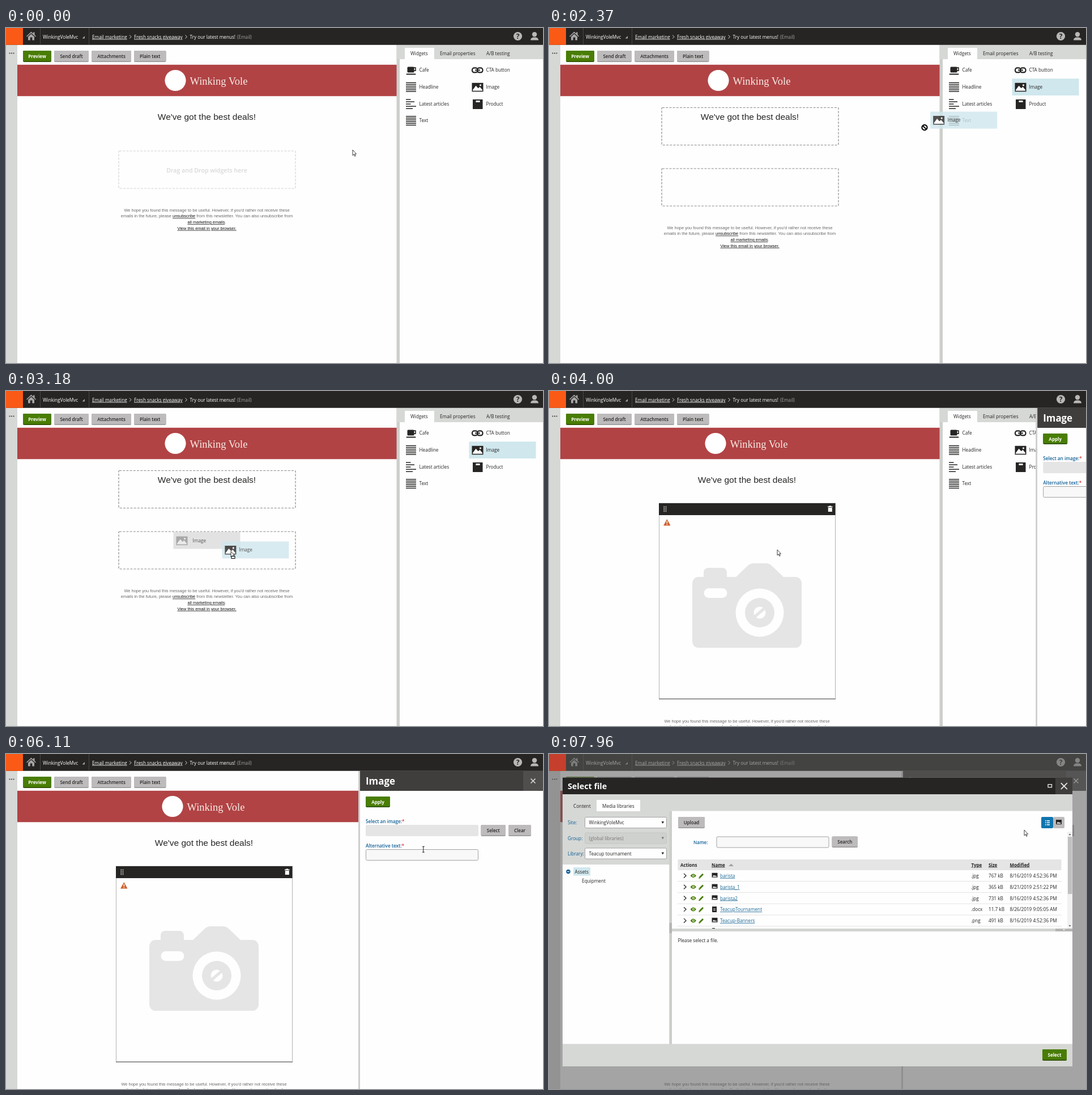
Write an HTML page that moves like this. It is 948 by 591 pixels and loops after 8000 ms.

```html
<!DOCTYPE html>
<html lang="en">
<head>
<meta charset="utf-8">
<title>Email builder</title>
<style>
html, body { margin: 0; width: 100%; height: 100%; overflow: hidden; background: #fefefe; }
svg { display: block; width: 948px; height: 591px; }
text { font: 8.2px "Open Sans", "Noto Sans", sans-serif; fill: #262524; white-space: pre; }
text.white { fill: #fff; }
text.grey { fill: #a3a2a2; }
text.bold { font-weight: 700; }
text.semi { font-weight: 600; font-size: 8px; }
text.label { fill: #0f5f96; }
text.link { fill: #1a6896; text-decoration: underline; }
text.under { text-decoration: underline; }
text.mid { text-anchor: middle; }
text.title { font-weight: 700; fill: #fff; }
text.mail { font: 7.46px "Liberation Sans", Arial, sans-serif; fill: #6a6a6a; text-anchor: middle; }
text.headline { font: 15.5px "Liberation Sans", Arial, sans-serif; text-anchor: middle; }
text.brand { font: 18.5px "Liberation Serif", serif; fill: #f8ece4; }
.mail tspan { fill: #111; text-decoration: underline; }
</style>
</head>
<body>
<svg id="stage" viewBox="0 0 948 591"></svg>
<script>
const DARK = '#262524', BAR = '#d6d8d5', GREEN = '#497d04', BUTTON = '#bdbbbb', PALE = '#cfe7ed';
const LOOP = 8000;

const rect = (x, y, w, h, fill, more = '') =>
  `<rect x="${x}" y="${y}" width="${w}" height="${h}" fill="${fill}" ${more}/>`;
const path = (d, fill = DARK, more = '') => `<path d="${d}" fill="${fill}" ${more}/>`;
const line = (d, color, width = 1) => path(d, 'none', `stroke="${color}" stroke-width="${width}"`);
const dot = (x, y, r, fill) => `<circle cx="${x}" cy="${y}" r="${r}" fill="${fill}"/>`;
const text = (x, y, s, cls = '', style = '') =>
  `<text x="${x}" y="${y}" class="${cls}" style="${style}">${s}</text>`;
const group = (id, body, more = '') => `<g id="${id}" ${more}>${body}</g>`;
const move = (x, y, body) => `<g transform="translate(${x} ${y})">${body}</g>`;

function button(x, y, w, h, label, green) {
  return rect(x, y, w, h, green ? '#2c4d02' : '#989797', 'rx="2"') +
    rect(x, y, w, h - 1.4, green ? GREEN : BUTTON, 'rx="1.5"') +
    text(x + w / 2, y + h / 2 + 3, label, green ? 'mid white bold' : 'mid semi', green ? 'font-size:8px' : '');
}
const field = (x, y, w, h, fill = '#f8f8f8') =>
  rect(x, y, w, h, fill, 'rx="2" stroke="#a3a2a2"');
const cross = (x, y, r, color, width) =>
  line(`M${x - r} ${y - r}L${x + r} ${y + r}M${x + r} ${y - r}L${x - r} ${y + r}`, color, width);

// Widget icons, placed relative to the top left corner of their list item
const rows = (pitch, widths) => widths.map((w, i) => rect(6.5, 6.4 + i * pitch, w, 1.5, DARK)).join('');
const icons = {
  cup: rect(9, 9, 12, 10, DARK, 'rx="1.5"') + line('M20.5 10.5h3v5h-3', DARK, 1.6) + rect(7, 21, 17, 2, DARK, 'rx="1"'),
  lines: rows(3.1, [18, 18, 18, 18, 18, 18]),
  list: rows(4, [8.5, 15, 8.5, 18, 12]),
  chain: [5.5, 14.5].map(x => rect(x, 10.8, 9.5, 8, 'none', `rx="3.5" stroke="${DARK}" stroke-width="2.2"`)).join('') +
    rect(10.5, 13.8, 9, 2, DARK),
  picture: rect(5, 7.5, 20, 15.5, DARK) + path('M6.5 20L12 12.5L16 17L19 14.5L23.5 20V21.5H6.5Z', '#fff') + dot(20, 11.5, 1.6, '#fff'),
  box: rect(6.5, 7, 17.5, 17, DARK) + rect(12, 9, 7, 3, '#fff')
};
const items = [
  ['Cafe', 0, 0, 'cup'], ['CTA button', 1, 0, 'chain'], ['Headline', 0, 1, 'lines'], ['Image', 1, 1, 'picture'],
  ['Latest articles', 0, 2, 'list'], ['Product', 1, 2, 'box'], ['Text', 0, 3, 'lines']
].map(([name, col, row, icon]) => ({ name, icon, x: 699.5 + 118 * col, y: 59.6 + 29.7 * row }));
const item = w => icons[w.icon] + text(30, 17.8, w.name);
const IMAGE = items[3];

const topBar = rect(0, 0, 948, 29.8, DARK) + rect(0, 0, 30, 29.8, '#fa5a16') +
  path('M36 14.5L44.5 6.5L48 9.8V7.5H50.5V12L53 14.5L52 15.6L44.5 8.8L37 15.6ZM39 15.4L44.5 10.4L50 15.4V21.5H46.3V16.5H42.7V21.5H39Z', '#aaa8a7') +
  line('M60.5 0V29M146.5 0V29', '#4a4847') +
  text(65, 18.6, 'WinkingVoleMvc', 'white') + path('M134.5 18.5H139V14Z', '#a3a2a2') +
  text(152, 18.6, 'Email marketing', 'white under') + text(226, 18.6, 'Fresh snacks giveaway', 'white under') +
  line('M218 12.5L221 15.5L218 18.5M316.5 12.5L319.5 15.5L316.5 18.5', '#ddd') +
  text(324.5, 18.6, 'Try our latest menus!', 'white') + text(408, 18.6, '(Email)', 'grey') +
  dot(903.5, 14.5, 7.6, '#b9b7b6') + text(903.5, 18.8, '?', 'mid bold', 'font-size:12px') +
  dot(933, 11.3, 4.2, '#b9b7b6') + path('M926 21.5Q926 17.5 930.5 16.5H935.500Q940 17.5 940 21.5Z', '#b9b7b6');

const sideBar = rect(0, 29.8, 20, 562, BAR) +
  [6.5, 10, 13.5].map(x => dot(x, 44.5, 1.1, '#403e3d')).join('');

const toolbar = button(30, 40, 50, 20, 'Preview', true) + button(85, 40, 61, 20, 'Send draft') +
  button(151, 40, 70, 20, 'Attachments') + button(226, 40, 56.5, 20, 'Plain text');

const zone = (y, color) =>
  rect(199, y, 312, 66, 'none', `rx="1" stroke="${color}" stroke-width="1.2" stroke-dasharray="4 2.2"`);

const footer = [
  `We hope you found this message to be useful. However, if you'd rather not receive these`,
  `emails in the future, please <tspan>unsubscribe</tspan> from this newsletter. You can also unsubscribe from`,
  `<tspan>all marketing emails</tspan>.`,
  `<tspan>View this email in your browser.</tspan>`
].map((s, i) => text(354.5, 323.8 + i * 10.65, s, 'mail')).join('');

const camera = rect(253, 328, 193, 125, '#e5e5e5', 'rx="11"') + rect(273, 312, 41, 30, '#e5e5e5', 'rx="8"') +
  path('M328 330L350 309Q355 304 361 304H383Q389 304 394 309L416 330Z', '#e5e5e5') +
  rect(273.5, 348, 41, 17, '#fefefe', 'rx="8.5"') + dot(372, 391, 42.5, '#fefefe') + dot(372, 391, 26, '#e5e5e5') +
  dot(372, 391, 10.5, '#fefefe') + line('M361 400L382 382', '#e5e5e5', 5);

const imageWidget = rect(194.5, 198, 311, 345, '#fefefe', 'stroke="#b4b3b2"') + line('M194 543.3H506', '#6f6e6d', 1.3) +
  rect(194, 198, 311.5, 21, DARK) +
  [0, 1, 2, 3].map(i => rect(202.5, 203.5 + i * 2.7, 1.6, 1.6, '#ddd') + rect(205.7, 203.5 + i * 2.7, 1.6, 1.6, '#ddd')).join('') +
  rect(492, 203.5, 8.5, 1.7, '#fff') + rect(494.5, 202.5, 3.5, 1.5, '#fff') + path('M492.8 206H499.8V213H492.8Z', '#fff') +
  path('M208.3 226L214.5 237.5H202Z', '#cf6130') + rect(207.6, 229.5, 1.5, 4, '#fff') + rect(207.6, 234.7, 1.5, 1.5, '#fff') +
  camera;

const widgetPanel = rect(689.5, 29.8, 5.5, 562, '#cdcfcc') + rect(695, 29.8, 253, 562, '#fefefe') +
  rect(689.5, 29.8, 258.5, 25.2, BAR) + rect(704, 35, 52, 20.5, '#fefefe') +
  text(714, 48.3, 'Widgets') + text(766, 48.3, 'Email properties') + text(848, 48.3, 'A/B testing') +
  items.map((w, i) => move(w.x, w.y, rect(0, 0, 118, 29.7, PALE, `id="hover${i}"`) + item(w))).join('');

const label = (y, s) => text(635, y, `${s}<tspan fill="#d33">*</tspan>`, 'label semi', 'font-size:8.2px');
const settings = rect(622, 29.8, 3, 562, '#cdcfcc') + rect(625, 29.8, 323, 562, '#fefefe') +
  rect(625, 29.8, 323, 35.2, '#403e3d') + rect(913, 29.8, 35, 35.2, '#504e4d') +
  text(635, 54, 'Image', 'title', 'font-size:16.9px') + cross(930.5, 47.5, 4, '#ddd', 1.5) +
  button(635, 75, 43, 19, 'Apply', true) +
  label(122, 'Select an image:') + rect(635, 125, 199, 20, '#e5e5e5', 'rx="2"') +
  button(838.5, 125, 43.5, 20, 'Select') +
  group('pressed', rect(838.5, 125, 43.5, 20, '#a09f9d', 'rx="2"') + text(860.2, 138, 'Select', 'mid semi')) +
  button(887, 125, 40, 20, 'Clear') +
  label(165, 'Alternative text:') + field(635.5, 168.5, 198, 19) +
  group('tip', rect(847.5, 142.5, 62, 14, '#fff', 'stroke="#8a8a8a" stroke-width=".8"') +
    text(878.5, 152.2, 'Select an image', 'mid', 'font-size:7.4px;fill:#575757'));

// File dialog
const picker = (y, name, value, off) => text(33, y + 13, name, 'label') +
  rect(63.5, y + .5, 144, 19, off ? '#cfd1ce' : '#fefefe', `rx="2" stroke="${off ? '#c4c6c3' : '#a3a2a2'}"`) +
  text(70.5, y + 13.3, value, '', off ? 'fill:#777' : '') + path(`M198.5 ${y + 8}h4.6l-2.3 4Z`, off ? '#777' : DARK);
const photo = (x, y) => rect(x, y, 10, 8, DARK) + path(`M${x + 1} ${y + 6.7}l2.6-3 2 1.8 1.4-1 2 2.2Z`, '#fff');
const files = [
  ['barista', '.jpg', '767 kB', '8/16/2019 4:52:36 PM'],
  ['barista_1', '.jpg', '365 kB', '8/21/2019 2:51:22 PM'],
  ['barista2', '.jpg', '731 kB', '8/16/2019 4:52:36 PM'],
  ['TeacupTournament', '.docx', '11.7 kB', '8/26/2019 9:05:05 AM'],
  ['Teacup-Banners', '.png', '491 kB', '8/16/2019 4:52:36 PM']
].map(([name, type, size, date], i) => {
  const y = 214.7 + i * 19.8;
  return line(`M238 ${y - 3.8}l4 3.8-4 3.8`, DARK, 1.3) +
    path(`M249.5 ${y}q5-7 10.5 0q-5.5 7-10.5 0Z`, GREEN) + dot(254.8, y, 2, '#fff') + dot(254.8, y, 1.1, GREEN) +
    line(`M266 ${y + 3}l6-6`, GREEN, 2.8) + path(`M264.5 ${y + 5}v-3l3 2.7Z`, GREEN) +
    (type == '.docx' ? rect(288, y - 5, 8, 10, DARK) + line(`M290 ${y - 1}h4M290 ${y + 1.5}h4`, '#fff', .9) : photo(287.5, y - 5)) +
    text(302, y + 3.2, name, 'link') + text(745, y + 3.2, type) + text(776, y + 3.2, size) +
    text(813.5, y + 3.2, date) + line(`M227 ${y + 9.9}H905`, '#e3e3e3');
}).join('');

const dialog = rect(0, 0, 948, 591, '#5c5c5c', 'opacity=".55"') + rect(0, 0, 30, 29.8, '#c63f2c') +
  rect(24, 41.5, 900, 509.5, BAR) + rect(24, 41.5, 900, 29.5, DARK) + rect(894, 41.5, 30, 29.5, '#403e3d') +
  text(33, 62, 'Select file', 'title', 'font-size:14.3px') + cross(909.3, 56.7, 5.5, '#e6e6e6', 1.8) +
  rect(881, 53.7, 6.5, 5, 'none', 'stroke="#eee" stroke-width="1.3"') +
  rect(84, 81, 77, 20, '#fefefe') + text(43, 94.5, 'Content') + text(94, 94.5, 'Media libraries') +
  picker(111, 'Site:', 'WinkingVoleMvc') + picker(138.5, 'Group:', '(global libraries)', true) +
  picker(165.5, 'Library:', 'Teacup tournament') +
  rect(24, 195, 188.5, 316.5, '#fefefe') + rect(43, 200, 30, 14.5, PALE) +
  dot(34, 207.5, 3.7, '#0f5f96') + rect(32, 206.9, 4, 1.2, '#fff') +
  text(45.5, 210.6, 'Assets') + text(58, 227, 'Equipment') +
  rect(212.5, 101, 4.5, 410.5, '#ccceca') + rect(217, 100.5, 707, 411, '#fefefe') + rect(212.5, 298, 4.5, 18, '#b5b6b4') +
  button(228, 111, 47, 20, 'Upload') +
  rect(869, 111, 21, 20, '#1175ae', 'rx="2"') + rect(890, 111, 20, 20, BUTTON, 'rx="2"') +
  [117, 120.5, 124].map(y => rect(876, y, 1.7, 1.6, '#fff') + rect(879, y, 5, 1.6, '#fff')).join('') + photo(895, 116) +
  text(255, 159, 'Name:', 'label semi') + field(296, 146, 198, 19) + button(499.5, 145.5, 45.5, 19.5, 'Search') +
  rect(227.5, 186, 677, 19, '#e5e5e5') + text(232, 198.5, 'Actions', 'bold', 'font-size:7.9px') +
  [[287, 'Name'], [745.5, 'Type'], [776, 'Size'], [813.5, 'Modified']]
    .map(([x, s]) => text(x, 198.5, s, 'bold under', 'font-size:7.9px')).join('') +
  path('M317 198L321.5 193.5L326 198Z', '#a3a2a2') + files + rect(288, 307, 5, 1, DARK) +
  rect(915, 137, 9, 171, '#f1f1f1') + rect(916, 146, 7.5, 101, '#c1c1c1') +
  path('M917.5 143h4l-2-2.5ZM917.5 302h4l-2 2.5Z', '#555') +
  rect(217, 308, 707, 5, '#d2d4d1') + rect(894, 308, 30, 5, '#b5b6b4') + path('M907 309.3h4l-2 2.2Z', '#fff') +
  text(227.5, 332, 'Please select a file.') + button(871, 521, 43, 20, 'Select', true);

const ink = 'stroke="#111" stroke-width=".8" stroke-linejoin="round"';
const arrow = path('M0 0V9.8L2.2 7.8L3.7 11.3L5.2 10.7L3.7 7.2H6.5Z', '#fff', ink);
const cursors = {
  arrow,
  grab: path('M0-6L2-4H.7V-.7H4V-2L6 0L4 2V.7H.7V4H2L0 6L-2 4H-.7V.7H-4V2L-6 0L-4-2V-.7H-.7V-4H-2Z', '#fff', ink),
  refuse: dot(0, 0, 6.3, '#fff') + `<circle r="4.6" fill="#fff" stroke="#111" stroke-width="2.2"/>` + line('M-3.3-3.3L3.3 3.3', '#111', 2.2),
  drop: arrow + rect(1, 8.5, 6, 4, '#fff', 'stroke="#111" stroke-width="1.1"'),
  beam: line('M-2-5H2M0-5V5M-2 5H2', '#222', 1),
  hand: path('M2 1Q3-.4 4 1V5.5L7.5 6.3Q9 6.8 9 8.5V10Q8.8 12.5 7.5 13H3.5Q1 10.5-.5 8Q0 6.5 2 8Z', '#fff', ink)
};

stage.innerHTML = rect(0, 0, 948, 591, '#fefefe') + toolbar + rect(20, 64.8, 670, 55.4, '#b14345') +
  group('email', dot(299, 92.5, 18.6, '#fff') + text(324.5, 100, 'Winking Vole', 'brand') +
    text(354.5, 162, `We've got the best deals!`, 'headline') + group('footer', footer)) +
  group('idleZone', zone(217, '#d2d2d2') +
    text(354.5, 254.5, 'Drag and Drop widgets here', 'mid', 'font-size:10.6px;font-weight:600;fill:#d8d8d8')) +
  group('dragZones', zone(140.5, '#8c8b8a') + zone(248, '#8c8b8a')) +
  group('slot', rect(0, 0, 118, 29.5, '#e2e2e2') + `<g opacity=".3">${icons.picture}</g>` +
    text(34, 17.8, 'Image', '', 'fill:#555'), 'transform="translate(295.5 249)"') +
  group('widget', imageWidget) + sideBar + widgetPanel + group('settings', settings) + topBar +
  group('ghost', rect(0, 0, 118, 30, PALE) + item(IMAGE), 'opacity=".8"') +
  group('dialog', dialog) +
  group('status', rect(0, 579.5, 315.5, 12, '#fefefe', 'stroke="#d0d0d0" stroke-width=".7"') +
    text(3, 588.7, 'Waiting for localhost...', '', 'font-size:6.7px;fill:#666')) +
  group('cursor', Object.entries(cursors).map(([k, body]) => group('c_' + k, body)).join(''));

const $ = id => document.getElementById(id);
const show = (id, on) => $(id).style.display = on ? '' : 'none';
const place = (id, x, y) => $(id).setAttribute('transform', `translate(${x} ${y})`);
const smooth = u => u * u * (3 - 2 * u);
const progress = (t, a, b) => Math.min(1, Math.max(0, (t - a) / (b - a)));

// start, end, target x, target y, skew of the easing (0 = linear)
const moves = [
  [330, 1110, 800, 123, .8], [1110, 1290, 814, 115, 0], [1290, 1440, 835, 106, 0],
  [1960, 3180, 397, 283, .78], [3180, 3330, 403, 280, 0], [5000, 6690, 839, 134, .9]
];
function pointer(t) {
  let x = 612, y = 215;
  for (const [a, b, tx, ty, skew] of moves) {
    const u = progress(t, a, b), e = skew ? smooth(u ** skew) : u;
    x += (tx - x) * e;
    y += (ty - y) * e;
  }
  return [x, y];
}
const inside = (x, y, l, t, w, h) => x >= l && x < l + w && y >= t && y < t + h;

function draw(t) {
  const [x, y] = pointer(t);
  const dragging = t >= 1960 && t < 3300, opened = t >= 3960, modal = t >= 7250;
  const overZone = dragging && inside(x, y, 199, 248, 312, 66);
  const hovered = opened ? -1 : dragging ? 3 : items.findIndex(w => inside(x, y, w.x, w.y, 118, 29.7));
  const onSelect = opened && inside(x, y, 838, 125, 44, 20);

  items.forEach((_, i) => show('hover' + i, i == hovered));
  show('idleZone', !dragging && !opened);
  show('dragZones', dragging);
  show('slot', overZone);
  show('widget', opened);
  place('email', opened ? -5 : 0, 0);
  place('footer', 0, opened ? 261 : dragging ? 31 : 0);

  show('settings', opened);
  place('settings', 323 * (1 - smooth(progress(t, 3930, 4140))), 0);
  show('pressed', onSelect);
  show('tip', t >= 6810 && t < 7070);

  // The dragged item trails the pointer slightly
  const [gx, gy] = pointer(t - 52);
  show('ghost', dragging && t > 1990);
  place('ghost', gx - 17, gy - 17);

  show('dialog', modal);
  show('status', t >= 7220 && t < 7510);
  $('status').setAttribute('opacity', .93 * (1 - progress(t, 7380, 7510)));

  const kind = overZone ? 'drop' : dragging ? 'refuse' : hovered >= 0 ? 'grab' :
    onSelect && t < 7890 ? 'hand' : opened && inside(x, y, 635, 168, 199, 20) ? 'beam' : 'arrow';
  for (const k in cursors) show('c_' + k, k == kind);
  place('cursor', x, y);
}

const start = performance.now();
function tick() {
  draw((performance.now() - start) % LOOP);
  requestAnimationFrame(tick);
}
tick();
</script>
</body>
</html>
```
